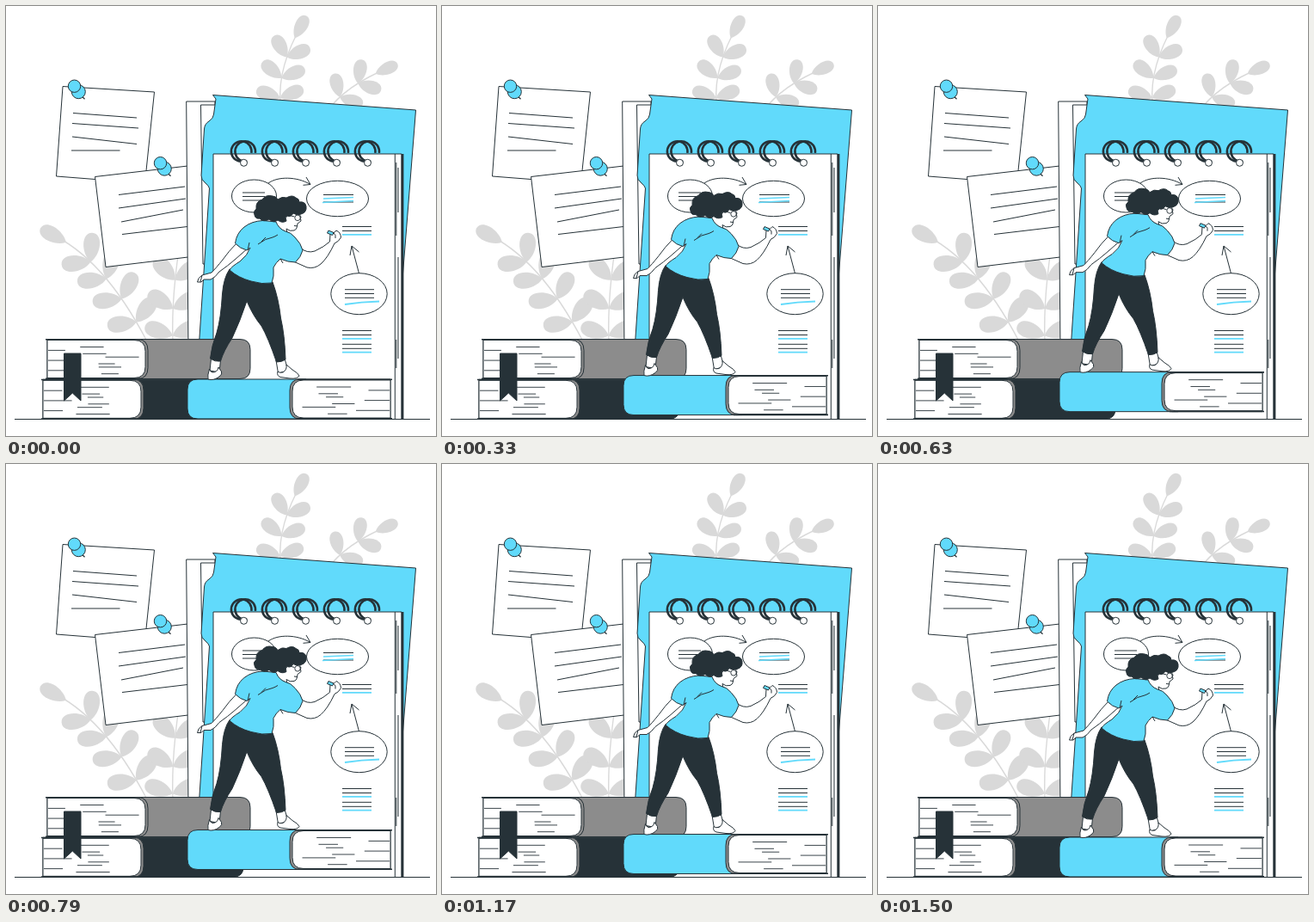
These frames come from a looping animation (500 px wide and 500 px high, 1540 ms). An HTML page with a canvas:

```html
<!DOCTYPE html>
<html lang="en">
<head>
<meta charset="utf-8">
<title>Notes and books</title>
<style>
  html, body { margin: 0; width: 100%; height: 100%; overflow: hidden; background: #fff; }
  canvas { display: block; width: 500px; height: 500px; }
</style>
</head>
<body>
<canvas id="stage"></canvas>
<script>
const BLUE = '#61dafb', DARK = '#263238', GREY = '#8c8c8c', LEAF = '#d9d9d9', WHITE = '#fff';
const LOOP = 1540, FLOAT = 1500, STEP = 1000 / 24;

const canvas = document.getElementById('stage');
const ctx = canvas.getContext('2d');
const ratio = window.devicePixelRatio || 1;
canvas.width = canvas.height = 500 * ratio;

function shape(d, fill, stroke = DARK, width = 1) {
  const path = new Path2D(d);
  if (fill) { ctx.fillStyle = fill; ctx.fill(path); }
  if (stroke) { ctx.strokeStyle = stroke; ctx.lineWidth = width; ctx.stroke(path); }
}

function line(x1, y1, x2, y2, color = DARK, width = 1) {
  shape(`M${x1} ${y1}L${x2} ${y2}`, null, color, width);
}

function ellipse(x, y, rx, ry, fill, width = 1) {
  ctx.beginPath();
  ctx.ellipse(x, y, rx, ry, 0, 0, Math.PI * 2);
  ctx.fillStyle = fill;
  ctx.fill();
  ctx.strokeStyle = DARK;
  ctx.lineWidth = width;
  ctx.stroke();
}

function at(x, y, draw) {
  ctx.save();
  ctx.translate(x, y);
  draw();
  ctx.restore();
}

function seeded(seed) {
  return () => (seed = seed * 16807 % 2147483647) / 2147483647;
}

// Teardrop leaf: pointed base at (x, y), round tip.
function leaf({ x, y }, angle, len, half) {
  at(x, y, () => {
    ctx.rotate(angle);
    shape(`M0 0C${len * .3} ${-half * 1.35} ${len} ${-half * 1.4} ${len} 0` +
          `C${len} ${half * 1.4} ${len * .3} ${half * 1.35} 0 0Z`, LEAF, null);
  });
}

// Leaf pairs along a quadratic stem, opening wider towards the root.
function plant([x0, y0], [x1, y1], [x2, y2], pairs, size, first) {
  shape(`M${x0} ${y0}Q${x1} ${y1} ${x2} ${y2}`, null, LEAF, 1.4);
  const bend = (a, b, c, t) => (1 - t) ** 2 * a + 2 * t * (1 - t) * b + t * t * c;
  const slope = (a, b, c, t) => (1 - t) * (b - a) + t * (c - b);
  const node = t => ({ x: bend(x0, x1, x2, t), y: bend(y0, y1, y2, t) });
  const heading = t => Math.atan2(slope(y0, y1, y2, t), slope(x0, x1, x2, t));
  for (let i = 0; i < pairs; i++) {
    const t = first + (.6 - first) * i / (pairs - 1);
    const spread = 1.25 - .65 * t;
    for (const side of [-1, 1]) leaf(node(t), heading(t) + side * spread, size, size * .27);
  }
  leaf(node(.84), heading(.9), size, size * .25);
}

function plants() {
  plant([319, 112], [316, 70], [344, 22], 3, 29, .06);
  plant([372, 124], [395, 92], [445, 72], 2, 28, .3);
  plant([164, 390], [113, 292], [50, 264], 4, 34, .12);
  plant([194, 390], [192, 335], [204, 265], 3, 34, .06);
}

function pin(x, y) {
  at(x, y, () => {
    line(6, 9, 12, 15, DARK, 1.3);
    ellipse(4.8, 6.5, 8, 8, BLUE);
    shape('M-5 4L0 10L8 3L5 -4Z', BLUE, null);
    shape('M-3 6Q3 8 6 2', null);
    ellipse(0, 0, 7.2, 7.2, BLUE);
  });
}

function stickyNotes() {
  shape('M66 93.5L172.5 100L161.5 206L58.5 198Z', WHITE);
  shape('M78 124.5L152 130M77 136.5L154 142M77 152L152 160.5M76 168H132.5', null);
  shape('M103.5 198.5L220 185V291L116 303.5Z', WHITE);
  shape('M131 219.5L208 210M131 235L209 224M134 251L206 237M135 265.5L211 256.5', null);
  pin(79.5, 93.2);
  pin(179.5, 182.7);
}

function folder() {
  shape('M209.7 111H243V400H212Z', WHITE);
  shape('M226.5 115H244V300H229Z', WHITE);
  shape('M240.5 103.5L476.5 121L460 330V400H224L236.5 212Q236 209 231 205Q227 202 227 197' +
        'L230.5 143Q231 137 236 134Q241 131 241.5 126L244 108Z', BLUE);
}

function ring(x) {
  ctx.strokeStyle = DARK;
  ctx.lineWidth = 2.6;
  for (const shift of [-2, 2.5]) {
    ctx.beginPath();
    ctx.arc(x + shift, 169, 11.8, Math.PI * .44, Math.PI * 2.05);
    ctx.stroke();
  }
  ellipse(x + .8, 182.3, 4, 4, WHITE);
}

function lines(x, y, width, count, gap) {
  for (let i = 0; i < count; i++) line(x, y + i * gap, x + width, y + i * gap);
}

function caption(x, y) {
  lines(x, y, 34, 2, 5);
  line(x, y + 9.3, x + 34, y + 9.3, BLUE, 1.8);
}

function notebook() {
  shape('M241 172H460V480.5H241Z', WHITE);
  line(461, 172, 461, 480, DARK, 2.8);
  shape('M452.3 172V480M453.8 182V267M456 188V240M456 292V410M453.8 388V421', null);
  for (let i = 0; i < 5; i++) ring(275.7 + i * 36);

  ellipse(288.5, 221, 26, 19, WHITE);
  lines(275, 217, 26, 3, 4.5);
  shape('M305 206C316 198 338 198 354 207.5M345.5 208.3L354 207.5L349 199', null);

  ellipse(385.5, 224, 36, 20.7, WHITE);
  lines(369, 219.5, 35, 2, 8.5);
  shape('M369 224L404 222.5M368 228.5L404 226.5', null, BLUE, 1.6);

  caption(391, 256.5);
  ellipse(410.5, 334.7, 32.7, 24, WHITE);
  lines(394, 329.7, 34, 3, 4.8);
  shape('M394 347Q413 344 434 343.5', null, BLUE, 1.8);
  shape('M410.5 311L402 279M400 290L402 279L410.5 286', null);
  caption(391, 377.5);
  caption(391, 393.3);
}

// Page edges: most strokes lie inside, every third starts at the open side.
function pageEdges(seed) {
  const random = seeded(seed);
  for (let i = 0; i < 9; i++) {
    const y = 9 + i * 3.9;
    const x = i % 3 === 1 ? 3 : 40 + random() * 32;
    const width = 14 + random() * 26;
    line(x, y, x + width, y, DARK, .9);
  }
}

// Book seen from its open side; dir -1 mirrors it.
function book(x, y, dir, end, color, seed) {
  at(x, y, () => {
    ctx.scale(dir, 1);
    shape(`M100 0H${end - 12}Q${end} 0 ${end} 12V34Q${end} 46 ${end - 12} 46H100Z`, color);
    shape('M2 0H107Q119 0 119 13V33Q119 46 107 46H2Z', GREY);
    shape('M2 1H103Q116 1 116 14V32Q116 45 103 45H2Z', WHITE);
    line(0, .2, 110, .2, DARK, 1.6);
    line(0, 45.8, 110, 45.8, DARK, 1.6);
    pageEdges(seed);
  });
}

function leftBooks() {
  book(41, 434.3, 1, 235, DARK, 4021);
  book(46, 387.5, 1, 238, GREY, 977);
  shape('M67.5 404H87V459L77.3 450L67.5 459Z', DARK);
}

function woman() {
  // feet
  shape('M238.5 410L237 424L248 426L249.5 412Z', WHITE);
  shape('M236.5 422Q234 430 235 434Q241 436 248 431Q252 428 250.5 425L247 420Q246 426 240 426Q237 425 236.5 422Z', WHITE);
  shape('M314 412L316.5 427L328 424L324 410Z', WHITE);
  shape('M316 425Q314.5 430 319 431.5L330 433Q339 434 341 430Q340 427 333 423L326 417Q327 423 322 426Q318 427 316 425Z', WHITE);
  // trousers
  shape('M260 306Q253 316 251.5 335Q250 363 245 380Q239 395 237.5 410Q243 414 249.5 413' +
        'Q253 401 263 386Q272 367 280 343Q287 360 297 372Q305 386 314.5 414Q321 414 325 411' +
        'Q324 382 319.5 363Q317 340 310 321Z', DARK);
  // rear arm
  shape('M268 276Q259 285 252 295Q244 305 239 310L228 313Q223 316 222.5 321L227 321L230 318L238 318' +
        'Q243 316 248 309Q258 302 266 295L282 281Z', WHITE);
  shape('M228 313L226 321', null);
  // front arm
  shape('M342 281Q350 288 359 285Q370 280 376.5 274L377 265Q379 262 381 264L384 261Q389 263 389.5 269' +
        'Q387 274 382 276Q374 293 366 300Q359 306 350 304L332 296Z', WHITE);
  shape('M381 264Q384 266 383 270', null);
  shape('M375 261L381 263.5L379.5 266.5L373.5 264Z', BLUE);
  // neck and face
  shape('M310 246L314 256L327 264L326 259Q330 262.5 335 261Q338 260 338.5 256.5L339 253L343 250L341 238L324 230Z', WHITE);
  // shirt
  shape('M299 249.5Q286 250 277 257Q268 264 266.5 276Q272 282 280 284L284 281Q281 290 272 297Q262 303 260 307' +
        'Q270 316 285 320Q298 324 309 322Q312 315 311 304Q314 298 319 294Q328 298 336.5 298' +
        'Q343 292 345 284Q343 276 336 269Q331 263 325 262Q317 259 314 251Z', BLUE);
  shape('M293 277Q302 270 310 269Q313 268 316 266M297 274L302 269M319 294L322 299M281 284L283 275', null);
  // glasses, mouth and hair
  shape('M335 255.5L339 256', null);
  ellipse(339, 246.3, 3.2, 3.3, WHITE, .9);
  shape('M335.5 245L328 243M342 245L343.5 245.5', null);
  shape('M289 243Q287 239 291 236Q290 227 298 225Q302 219 310 221Q314 221 316 225Q321 221 326 223' +
        'Q333 219 337 223Q341 224 341 228Q348 227 349 233Q350 240 343 242Q338 244 334 241' +
        'Q331 246 327 244Q324 246 326 250Q321 253 316 249Q311 253 306 248Q299 252 295 247Q290 248 289 243Z', DARK);
}

function lift(time) {
  const frame = Math.floor((time % LOOP + 5) / STEP);
  const phase = (frame * STEP + 35) % FLOAT / FLOAT;
  return 10 * (1 - Math.abs(2 * phase - 1));
}

function render(time) {
  ctx.setTransform(ratio, 0, 0, ratio, 0, 0);
  ctx.fillStyle = WHITE;
  ctx.fillRect(0, 0, 500, 500);
  ctx.lineJoin = 'round';
  plants();
  stickyNotes();
  folder();
  notebook();
  line(10, 480.5, 493, 480.5);
  leftBooks();
  at(0, .47 - lift(time), () => {
    book(449, 434, -1, 238, BLUE, 31337);
    woman();
  });
}

const start = performance.now();
function tick() {
  render(performance.now() - start);
  requestAnimationFrame(tick);
}
tick();
</script>
</body>
</html>
```
